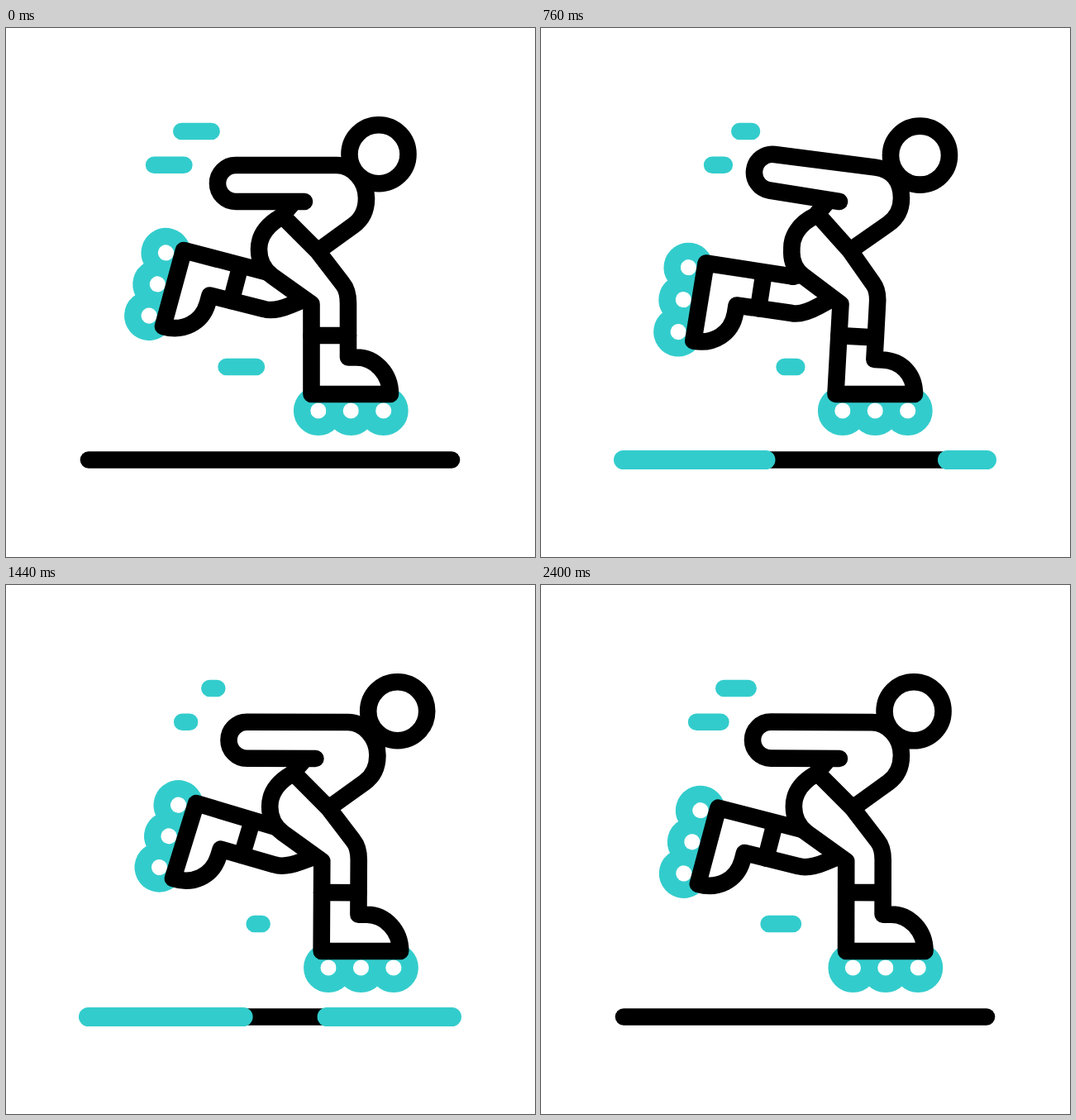
Recreate the animation shown at these times as an HTML page. Size 640x640 px, loop 2440 ms.

```html
<!DOCTYPE html>
<html lang="en">
<head>
<meta charset="utf-8">
<title>Inline skater</title>
<style>
html, body { margin: 0; width: 100%; height: 100%; overflow: hidden; background: #fff; }
svg { display: block; width: 100vw; height: 100vh; }
.ink { fill: none; stroke: #000; stroke-width: 20.6; stroke-linecap: round; stroke-linejoin: round; }
.solid { fill: #fff; }
.teal { fill: none; stroke: #33cccc; stroke-width: 20.6; stroke-linecap: round; }
.wheel { fill: #fff; stroke: #33cccc; stroke-width: 20.4; }
</style>
</head>
<body>
<svg viewBox="0 0 640 640">
  <path id="dashes" class="teal"/>
  <g id="backLeg">
    <g class="wheels" transform="translate(215 269) rotate(105)"></g>
    <path class="ink solid" d="M318 296L215 269L190 361C214 368 237 357 243.900 333L246.500 323.500L312 340C322 343 333 340 345 335L362 328"/>
    <path class="ink" d="M283.500 288L272.500 330"/>
  </g>
  <path id="link" class="ink"/>
  <g id="frontWheels" class="wheels"></g>
  <path id="frontLeg" class="ink solid"/>
  <path id="cuff" class="ink"/>
  <path id="torso" class="ink"/>
  <circle id="head" class="ink solid" r="35.500"/>
  <path class="ink" d="M100 522.500H539"/>
  <path id="glow" class="teal" style="stroke-width:23"/>
</svg>
<script>
const LOOP = 2440, STEP = 40;
const $ = id => document.getElementById(id);
const set = (id, name, value) => $(id).setAttribute(name, value);
const pt = (x, y) => x.toFixed(2) + ' ' + y.toFixed(2);

for (const g of document.querySelectorAll('.wheels')) {
  g.innerHTML = [0, 1, 2].map(i =>
    `<circle class="wheel" cx="${8.4 + 39.4 * i}" cy="20" r="19.800"/>`).join('');
}

// Smooth curve through (times, values), at rest at both ends
function curve(times, values, t) {
  const last = times.length - 1;
  if (t <= times[0]) return values[0];
  if (t >= times[last]) return values[last];
  const slope = k => k === 0 || k === last ? 0
    : (values[k + 1] - values[k - 1]) / (times[k + 1] - times[k - 1]);
  let i = 0;
  while (t >= times[i + 1]) i++;
  const d = times[i + 1] - times[i], u = (t - times[i]) / d, w = 1 - u;
  return w * w * (1 + 2 * u) * values[i] + u * u * (3 - 2 * u) * values[i + 1]
    + d * u * w * (w * slope(i) - u * slope(i + 1));
}

function spin(x, y, cx, cy, a) {
  const c = Math.cos(a), s = Math.sin(a);
  return [cx + (x - cx) * c - (y - cy) * s, cy + (x - cx) * s + (y - cy) * c];
}

const BEATS = [0, 440, 760, 1160, 1680, 1880, 2080, LOOP];
const POSE = {
  body: [0, 5.5, 0, 11, 13, 6, 0, 0],
  head: [0, 5.3, 7.5, 11, 7, 5.5, 4, 0],
  foot: [0, -21.5, -13, 11, -16, -20, -16.5, 0],
  arm:  [0, 16, 9.4, -8.8, 11.2, 15, 11.6, 0],
  kick: [0, 11.9, 6, -10.9, 8.7, 11.8, 10.1, 0]
};
const HIP = [360, 340];

function drawLegs({ body, foot, arm, kick }) {
  const rad = Math.PI / 180;
  const shear = (x, y) => [x + body + foot * Math.max(0, y - 229) / 195, y];
  const p = (x, y) => pt(...shear(x, y));
  const shift = body + foot * 0.68;

  set('backLeg', 'transform', `translate(${shift} 0) rotate(${-kick} ${HIP})`);
  const [ex, ey] = spin(318, 296, ...HIP, -kick * rad);
  set('link', 'd', `M${pt(ex + shift, ey)}L${p(320, 298)}`);

  // The sole stays flat while the shin tilts over the heel
  const heel = 369.5 + body + foot;
  const tilt = (shear(369.5, 333)[0] - heel) / 110;
  const b = (x, y) => pt(...spin(heel + x, 443 + y, heel, 443, tilt));
  const lift = 0.2 * arm;
  set('frontWheels', 'transform', `translate(${heel} 443)`);
  set('frontLeg', 'd',
    `M${p(345, 214 - lift)}L${p(332, 229 - lift)}` +
    `C${p(315 - lift, 239 - 1.5 * lift)} ${p(306 - lift, 252)} ${p(306, 268)}` +
    `C${p(306, 281)} ${p(311, 292)} ${p(322, 300)}L${p(369.5, 334)}L${pt(heel, 443)}` +
    `h95.500C${pt(heel + 95.5, 418.4)} ${b(77.2, -44.5)} ${b(54.5, -44.5)}` +
    `L${b(44.5, -44.5)}L${b(44.5, -71)}L${p(414, 333)}` +
    `C${p(414, 324)} ${p(412, 315)} ${p(407, 309)}L${p(377, 270)}L${p(336, 229 - lift)}`);
  set('cuff', 'd', `M${b(0, -71)}L${b(44.5, -71)}`);
  return p;
}

function drawTorso({ body, arm, head }, legPoint) {
  const a = arm * Math.PI / 180, r = 22;
  const cx = 278 + body + 0.2 * arm;
  const cy = 188 - 83 * Math.sin(a) + r * (1 - Math.cos(a));
  const hx = 361 + body, hy = 210;
  const sx = 400 + body + 0.5 * arm, sy = 166 + arm * (arm < 0 ? 0.65 : 0.28);
  // Lines from hand and shoulder touch the round elbow as tangents
  const tangent = (x, y, side) =>
    Math.atan2(y - cy, x - cx) + side * Math.asin(r / Math.hypot(x - cx, y - cy));
  const low = tangent(hx, hy, -1), top = tangent(sx, sy, 1);
  const c = Math.cos(top), s = Math.sin(top);
  const lift = 0.2 * arm;
  set('torso', 'd',
    `M${pt(hx, hy)}L${pt(cx - r * Math.sin(low), cy + r * Math.cos(low))}` +
    `A${r} ${r} 0 ${top > low ? 1 : 0} 1 ${pt(cx + r * s, cy - r * c)}L${pt(sx, sy)}` +
    `C${pt(sx + 20 * c, sy + 20 * s)} ${pt(436 + body, 185)} ${pt(436 + body, 206)}` +
    `C${pt(436 + body, 221)} ${pt(430 + body, 232 - lift)} ${pt(420 + body, 239 - lift)}` +
    `L${legPoint(380, 268 - 0.6 * lift)}`);
  set('head', 'cx', 451 + body + head);
  set('head', 'cy', 152.7 + Math.max(0, arm) * 0.15);
}

const PASSES = [0, 870, 1570, LOOP];
const DASH_T = [-170, -110, -40, 0, 110, 270];
const DASH_LEFT = [255, 240.3, 221.3, 212.3, 184.6, 145];
const DASH_RIGHT = [255, 255, 250.6, 248.6, 218.8, 145];

function drawDashes(t) {
  let d = '';
  for (const pass of PASSES) {
    const k = t - pass;
    if (k <= DASH_T[0] || k >= 270) continue;
    const left = curve(DASH_T, DASH_LEFT, k), right = curve(DASH_T, DASH_RIGHT, k);
    for (const [dx, y] of [[0, 125], [-33.2, 165.7], [54.3, 410]]) {
      d += `M${pt(left + dx, y)}L${pt(right + dx, y)}`;
    }
  }
  set('dashes', 'd', d);
}

// A strip running leftwards that wraps round the ground line
const X0 = 99.5, SPAN = 440;
const GLOW_T = [0, 440, 560, 760, 1160, 1680, 2080, 2240];
const GLOW_L = [539.5, 147.5, 97, 51.5, -238, -718.5, -1083, -1220.5];
const GLOW_R = [539.5, 367, 331, 272, 125, -444.5, -1013.5, -1220.5];

function drawGlow(t) {
  let d = '';
  if (t > 0 && t < 2240) {
    const left = curve(GLOW_T, GLOW_L, t), right = curve(GLOW_T, GLOW_R, t);
    for (let k = 0; k < 5; k++) {
      const a = Math.max(X0, left + k * SPAN), b = Math.min(X0 + SPAN, right + k * SPAN);
      if (b > a) d += `M${pt(a, 522.5)}L${pt(b, 522.5)}`;
    }
  }
  set('glow', 'd', d);
}

function draw(t) {
  const pose = {};
  for (const name in POSE) pose[name] = curve(BEATS, POSE[name], t);
  drawTorso(pose, drawLegs(pose));
  drawDashes(t);
  drawGlow(t);
}

const start = performance.now();
function tick() {
  const t = (performance.now() - start) % LOOP;
  draw(Math.floor(t / STEP) * STEP);
  requestAnimationFrame(tick);
}
draw(0);
requestAnimationFrame(tick);
</script>
</body>
</html>
```
